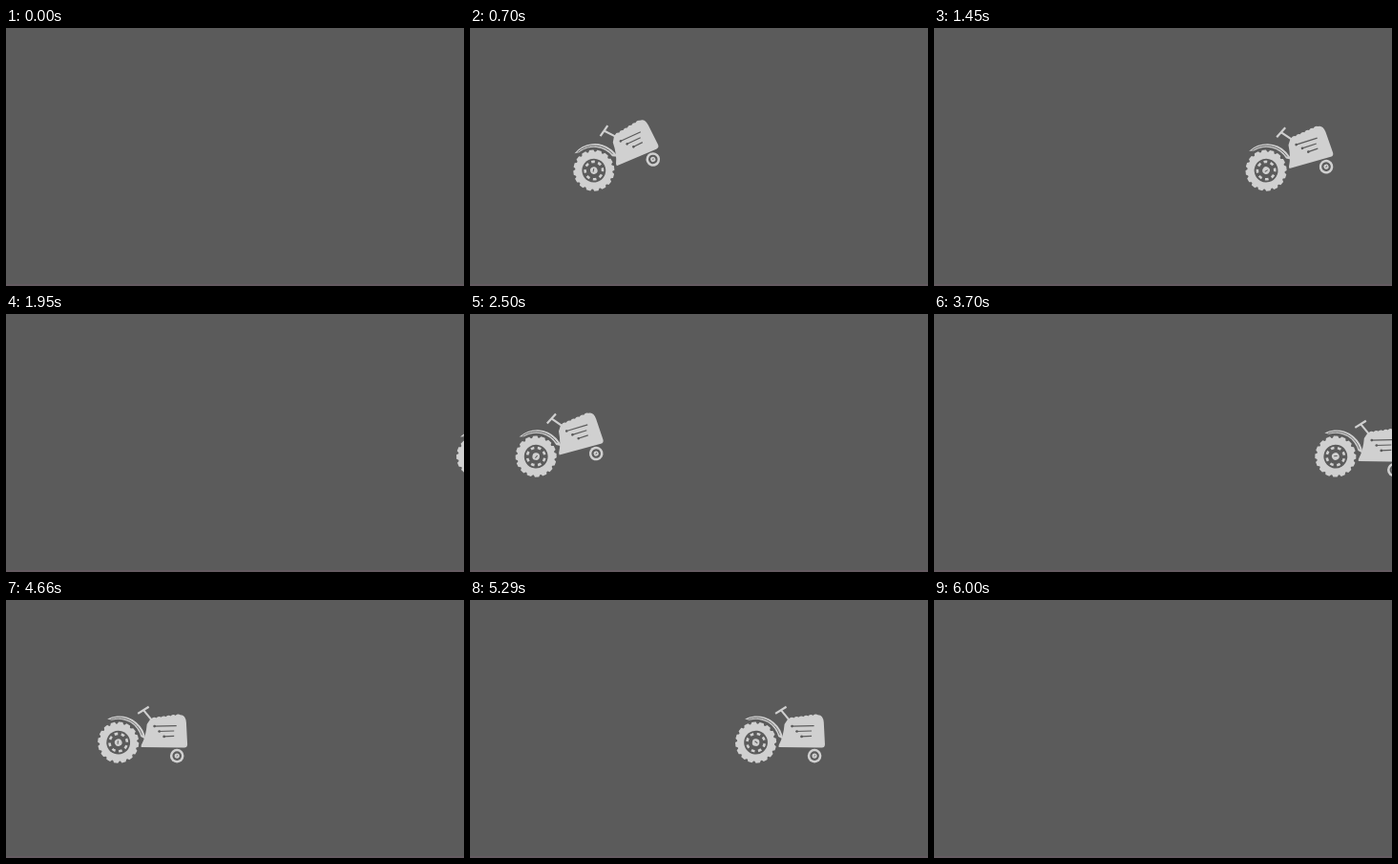
An HTML page with a canvas that plays this animation: 480 by 270 pixels, repeating every 6.1 s.

```html
<!DOCTYPE html>
<html lang="en">
<head>
<meta charset="utf-8">
<title>Tractor wheelie</title>
<style>
html, body { margin: 0; width: 100%; height: 100%; overflow: hidden; background: #5b5b5b; }
canvas { display: block; width: 480px; height: 270px; }
</style>
</head>
<body>
<canvas id="stage" width="480" height="270"></canvas>
<script>
const ctx = document.getElementById('stage').getContext('2d');
const DARK = '#5b5b5b', LIGHT = '#d0d0d0', EDGE = '#655b61';
const LOOP = 6100, FPS = 24, LAST = 144, PASS = 48;
const START_X = -76.3, SPEED = 12.125, AXLE_Y = 149.1, RADIUS = 21.6;
const TAU = Math.PI * 2;

// [step, tilt in degrees], eased between neighbours
const TILT = [
  [0, 0], [14.5, -27.5], [21, -15], [27.5, -28.5], [33.8, -15.5],
  [40.5, -27.5], [47, -15], [53.5, -29.5], [67, 0]
];

function tiltAt(step) {
  for (let i = 1; i < TILT.length; i++) {
    const [s0, a0] = TILT[i - 1], [s1, a1] = TILT[i];
    if (step <= s1) {
      const p = (1 - Math.cos(Math.PI * (step - s0) / (s1 - s0))) / 2;
      return (a0 + (a1 - a0) * p) * Math.PI / 180;
    }
  }
  return 0;
}

function disc(x, y, r, color) {
  ctx.fillStyle = color;
  ctx.beginPath();
  ctx.arc(x, y, r, 0, TAU);
  ctx.fill();
}

function line(x0, y0, x1, y1, width, color) {
  ctx.strokeStyle = color;
  ctx.lineWidth = width;
  ctx.beginPath();
  ctx.moveTo(x0, y0);
  ctx.lineTo(x1, y1);
  ctx.stroke();
}

function arc(x, r, from, to, width, color) {
  ctx.strokeStyle = color;
  ctx.lineWidth = width;
  ctx.beginPath();
  ctx.arc(x, 0, r, from, to);
  ctx.stroke();
}

function rearWheel(turn) {
  ctx.save();
  ctx.rotate(turn);
  const lugs = 16;
  ctx.fillStyle = LIGHT;
  ctx.beginPath();
  for (let i = 0; i < lugs; i++) {
    const a = i * TAU / lugs;
    [[0, 19.6], [0.07, RADIUS], [0.27, RADIUS], [0.33, 19.6]].forEach(([da, r]) =>
      ctx.lineTo(Math.cos(a + da) * r, Math.sin(a + da) * r));
  }
  ctx.fill();
  disc(0, 0, 12.4, DARK);
  for (let i = 0; i < 8; i++) {
    const a = i * TAU / 8;
    arc(0, 9.2, a, a + 0.4, 2.6, LIGHT);
  }
  disc(0, 0, 3.8, LIGHT);
  line(-0.5, 1.8, 1.2, -1.2, 1, DARK);
  ctx.restore();
}

function frontWheel() {
  disc(61.5, 14, 7.3, LIGHT);
  disc(61.5, 14, 4.8, DARK);
  disc(61.5, 14, 2.6, LIGHT);
  line(61, 14.6, 62.3, 13.3, 0.9, DARK);
}

function hood() {
  ctx.fillStyle = LIGHT;
  ctx.beginPath();
  ctx.moveTo(24, 3);
  ctx.quadraticCurveTo(29, -6, 30, -19);
  ctx.lineTo(34, -25);
  for (let i = 0; i < 6; i++) {
    const x = 35 + i * 5, y = -25.2 - i * 0.65;
    ctx.lineTo(x, y);
    ctx.quadraticCurveTo(x + 2.5, y - 2.2, x + 5, y - 0.4);
  }
  ctx.quadraticCurveTo(70.5, -29, 71.2, -21);
  ctx.lineTo(72.4, 2);
  ctx.quadraticCurveTo(72.4, 5.5, 69, 5.5);
  ctx.lineTo(24, 5);
  ctx.fill();

  [[37, -17, 61], [42, -11.6, 58.5], [47, -6.2, 58.5]].forEach(([x, y, end]) => {
    line(x, y, end, y - 0.5, 1.2, DARK);
    disc(x + 1, y, 1.3, DARK);
  });
}

function fender() {
  ctx.fillStyle = LIGHT;
  ctx.beginPath();
  ctx.arc(1.2, 0, 27.6, -2.05, -0.12);
  ctx.arc(0, 0, 24.4, -0.25, -1.85, true);
  ctx.fill();
  arc(0.4, 25.9, -1.9, -0.3, 0.8, DARK);
}

function steering() {
  line(20.5, -30.2, 32, -37.4, 2.2, LIGHT);
  line(26.3, -34, 35, -23.5, 2.1, LIGHT);
}

function draw(step) {
  ctx.fillStyle = DARK;
  ctx.fillRect(0, 0, 480, 270);
  ctx.fillStyle = EDGE;
  ctx.fillRect(0, 268, 480, 2);

  const travel = (step % PASS) * SPEED;
  ctx.save();
  ctx.translate(START_X + travel, AXLE_Y);
  ctx.rotate(tiltAt(step));
  fender();
  steering();
  hood();
  frontWheel();
  rearWheel(travel / RADIUS);
  ctx.restore();
}

// Steps run at 24 per second and start on whole hundredths of a second.
function stepAt(ms) {
  const tick = Math.floor(ms / 10) * 10 + 10;
  return Math.min(LAST, Math.ceil(tick * FPS / 1000) - 1);
}

const begin = performance.now();
function frame() {
  draw(stepAt((performance.now() - begin) % LOOP));
  requestAnimationFrame(frame);
}
frame();
</script>
</body>
</html>
```
